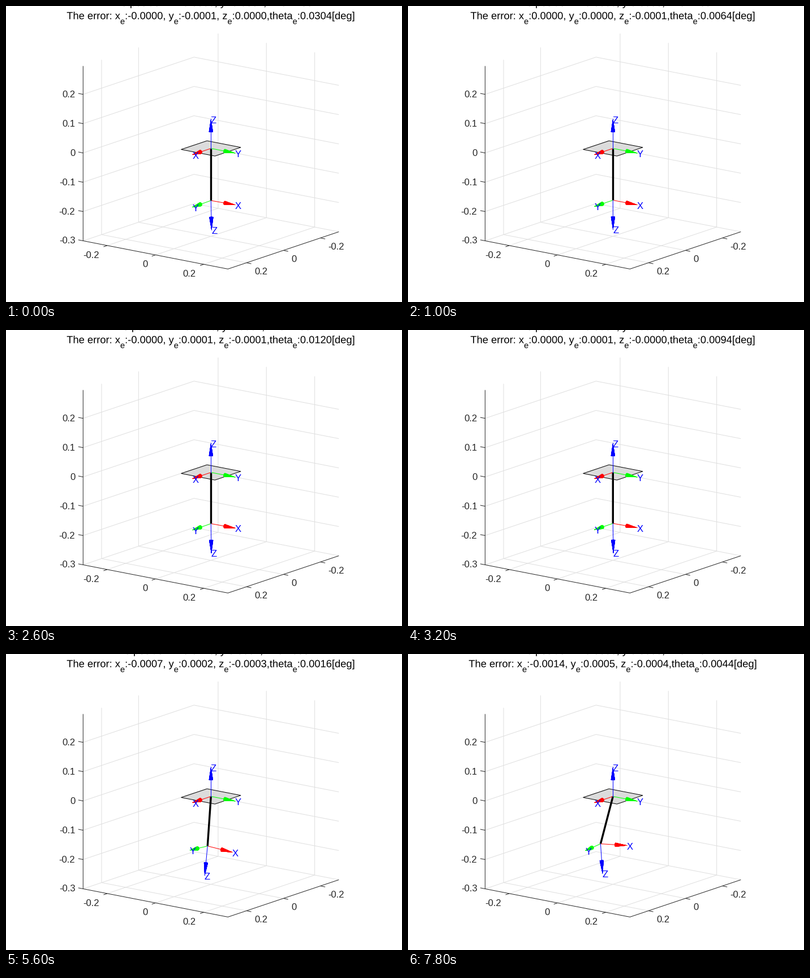
These frames come from a looping animation (700 by 525 pixels, 8 s). A matplotlib script:

```python
import numpy as np
import matplotlib.pyplot as plt
from matplotlib.animation import FuncAnimation
from matplotlib.collections import LineCollection, PolyCollection
from matplotlib.patches import PathPatch
from matplotlib.path import Path
from matplotlib.textpath import TextPath
from matplotlib.transforms import Affine2D

W, H, DPI = 700, 525, 100
FRAMES, STEP = 40, 200
PT = 72 / DPI
INK, BLUE = "#262626", "#0000ff"
LABEL, TITLE, SUB = 16.67, 18.33, 14.67
MID = 362

plt.rcParams["font.family"] = "Liberation Sans"
fig = plt.figure(figsize=(W / DPI, H / DPI), dpi=DPI, facecolor="white")
ax = fig.add_axes([0, 0, 1, 1])
ax.set_xlim(0, W)
ax.set_ylim(H, 0)
ax.axis("off")

# Orthographic projection: screen vectors of one unit along x, y, z
ORIGIN = np.array([362.3, 252.6])
BASIS = np.array([[-326.7, 110.0], [426.7, 83.3], [0, -519.6]])
LIM, TOP, TICK = 0.3, 0.2966, 0.02
AXIS, HEAD, RADIUS = 0.1, 0.043, 0.0065


def project(points):
    return ORIGIN + np.asarray(points, float) @ BASIS


def lines(segments, color, z=1):
    ax.add_collection(LineCollection([project(s) for s in segments], colors=color,
                                     linewidths=PT, zorder=z))


def write(x, y, s, color=INK, ha="left"):
    return ax.text(x, y, s, fontsize=LABEL * PT, color=color, ha=ha,
                   va="baseline", zorder=9)


def draw_box():
    levels = np.arange(-3, 3) / 10
    marks = (-0.2, 0, 0.2)
    grid = [[(v, -LIM, TOP), (v, -LIM, -LIM), (v, LIM, -LIM)] for v in marks[1:]]
    grid += [[(-LIM, v, TOP), (-LIM, v, -LIM), (LIM, v, -LIM)] for v in marks]
    grid += [[(LIM, -LIM, v), (-LIM, -LIM, v), (-LIM, LIM, v)] for v in levels]
    lines(grid, "#dfdfdf")

    edge = [(LIM, -LIM, TOP), (LIM, -LIM, -LIM), (LIM, LIM, -LIM), (-LIM, LIM, -LIM)]
    ticks = []

    def tick(point, out, dx, dy, ha, v):
        ticks.append([point, np.add(point, out)])
        x, y = project(point)
        write(x + dx, y + dy, f"{v:g}", ha=ha)

    for v in levels:
        tick((LIM, -LIM, v), (0, -TICK, 0), -14, 5, "right", v)
    for v in marks:
        tick((LIM, v, -LIM), (TICK, 0, 0), -14, 22, "right", v)
        tick((v, LIM, -LIM), (0, TICK, 0), 14, 21, "left", v)
    lines([edge] + ticks, INK, z=2)


class Arrow:
    """Thin shaft with a solid cone and a letter at the tip."""

    def __init__(self, name, color):
        self.shaft, = ax.plot([], [], color=color, lw=PT, zorder=6)
        self.cone = PolyCollection([], facecolors=color, edgecolors=color,
                                   linewidths=0.2, zorder=7)
        ax.add_collection(self.cone)
        self.label = write(0, 0, name, color=BLUE)

    def place(self, start, d):
        tip = start + AXIS * d
        u = np.cross(d, [0.3, 0.5, 0.8])
        u /= np.linalg.norm(u)
        a = np.linspace(0, 2 * np.pi, 21)[:, None]
        ring = project(tip - HEAD * d + RADIUS * (np.cos(a) * u + np.sin(a) * np.cross(d, u)))
        p = project(tip)
        self.shaft.set_data(*np.array([project(start), p]).T)
        self.cone.set_verts([ring] + [[p, m, n] for m, n in zip(ring, ring[1:])])
        self.label.set_position(p + (-0.3, 7))


def triad():
    return [Arrow(n, c) for n, c in zip("XYZ", ("#ff0000", "#00ff00", BLUE))]


def rotate(v, w):
    angle = np.linalg.norm(w)
    if angle < 1e-9:
        return v
    k = w / angle
    return (v * np.cos(angle) + np.cross(k, v) * np.sin(angle)
            + k * (k @ v) * (1 - np.cos(angle)))


def wave(t, period, peak=0):
    return np.cos(2 * np.pi * (t - peak) / period)


def drift(t):
    return max(0, (t - 3) / 4.8)


def pose(t):
    """Tool position and rotation vector at t seconds."""
    u = drift(t)
    push, sway = u**2.1, np.sin(np.pi * u)
    pos = np.array([0.067 * push, 0, -0.178 + 0.0012 * t + 0.021 * push])
    wobble = 0.009 * wave(t, 3.2) * (1 - u)
    turn = np.array([0.007 + wobble - 0.072 * sway**3 + 0.068 * u**4,
                     0.003 + wobble - 0.082 * sway,
                     0.135 * push])
    return pos, turn


def error(t):
    u = drift(t)
    ex = -0.2 + 0.6 * wave(t, 2.6, 0.6) - 14.2 * u**1.15
    ey = -0.6 + 0.655 * t - np.sin(np.pi * u)**2
    ez = -0.9 + 0.95 * wave(t, 3.4) - 3.3 * np.sin(np.pi * u / 2)**2
    return np.array([ex, ey, ez]) * 1e-4


theta = np.random.default_rng(4).exponential(0.008, FRAMES)


def right_edge(s, size):
    return TextPath((0, 0), s, size=size).get_extents().x1


def line_path(text, baseline):
    """Centred line of text; pieces after each underscore sit lower and smaller."""
    glyphs, x = [], 0
    for i, piece in enumerate(text.split("_")):
        runs = [(piece, TITLE, 0)] if i == 0 else [(piece[0], SUB, -8.7), (piece[1:], TITLE, 0)]
        for s, size, drop in runs:
            glyphs.append(TextPath((x, drop), s, size=size))
            x += right_edge(s + "|", size) - right_edge("|", size)
    place = Affine2D().scale(1, -1).translate(MID - x / 2, baseline)
    return Path.make_compound_path(*glyphs).transformed(place)


def title_line():
    return ax.add_patch(PathPatch(line_path("-", 0), fc="black", lw=0, zorder=9))


draw_box()
plate = 0.07 * np.array([(1, -1, 0), (-1, -1, 0), (-1, 1, 0), (1, 1, 0)])
ax.add_patch(plt.Polygon(project(plate), fc="#dcdcdc", ec="black", lw=PT, zorder=4))
for arrow, axis in zip(triad(), np.eye(3)):
    arrow.place(np.zeros(3), axis)

rod, = ax.plot([], [], color="black", lw=3.4 * PT, solid_capstyle="butt", zorder=5)
tool = triad()
TOOL_AXES = np.array([[0, 1, 0], [1, 0, 0], [0, 0, -1]], float)
top_line, error_line = title_line(), title_line()


def update(i):
    t = i * STEP / 1000
    pos, turn = pose(t)
    rod.set_data(*project([(0, 0, 0), pos]).T)
    for arrow, axis in zip(tool, TOOL_AXES):
        arrow.place(pos, rotate(axis, turn))
    err = error(t)
    x, y, z = pos + err
    top_line.set_path(line_path(f"The position: x:{x:.4f}, y:{y:.4f}, z:{z:.4f}", 0))
    ex, ey, ez = err
    error_line.set_path(line_path(
        f"The error: x_e:{ex:.4f}, y_e:{ey:.4f}, z_e:{ez:.4f},theta_e:{theta[i]:.4f}[deg]", 23.4))
    return []


anim = FuncAnimation(fig, update, frames=FRAMES, interval=STEP, repeat=True,
                     repeat_delay=0, blit=False)
plt.show()
```
